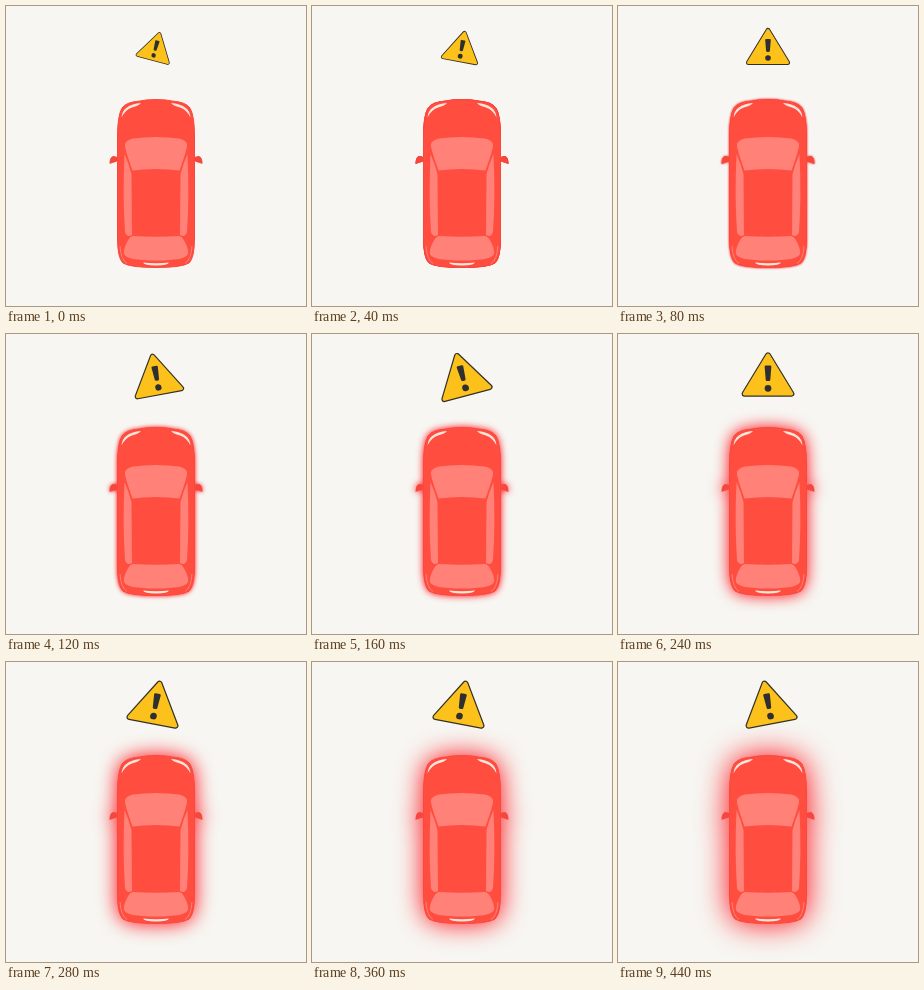
An HTML page that plays this animation: 300 px wide and 300 px high, repeating every 480 ms.

```html
<!DOCTYPE html>
<html lang="en">
<head>
<meta charset="utf-8">
<title>Car alert</title>
<style>
  html, body { margin: 0; height: 100%; overflow: hidden; background: #f7f6f2; }
  svg { display: block; width: 100vw; height: 100vh; }
</style>
</head>
<body>
<svg viewBox="0 0 300 300">
  <defs>
    <g id="side">
      <path fill="#f5473c" d="M113 158 L111 155.5 Q107 156.5 103.5 158 Q103.500 151 107 150 Q111 150 113 153Z"/>
    </g>
    <g id="trim">
      <path fill="#ff8177" d="M118.500 148 Q123 158 125.500 168 L126 229 Q121 232 119 226 Q116.500 190 118.500 148Z"/>
      <path fill="#ffe6dc" d="M115.500 111.500 Q116.500 98.500 135 97 Q133 99.500 126 101.500 Q119 104 115.500 111.500Z"/>
      <path fill="none" stroke="#ff8177" d="M114 240 Q115 254 121 257.500"/>
    </g>
  </defs>
  <g id="car">
    <use href="#side"/>
    <use href="#side" transform="matrix(-1 0 0 1 300 0)"/>
    <path fill="#ff4d40" stroke="#f9493e" d="M150 93.500 Q140 93.500 134 95 Q120 96 116 102 Q111.500 110 111.500 130 V232 Q111.500 252 117 257 Q124 261.500 150 261.500 Q176 261.500 183 257 Q188.500 252 188.500 232 V130 Q188.500 110 184 102 Q180 96 166 95 Q160 93.500 150 93.500Z"/>
    <use href="#trim"/>
    <use href="#trim" transform="matrix(-1 0 0 1 300 0)"/>
    <g fill="#ff8177">
      <path d="M119 138 Q120 134 127 132.500 Q150 129.500 173 132.500 Q180 134 181 138 Q182 141 173.500 164.500 Q150 161.500 126.500 164.500 Q118 141 119 138Z"/>
      <path d="M127 230 Q150 231.500 173 230 Q176 230 179 236 Q183 244 182 248 Q180 254.500 150 254.500 Q120 254.500 118 248 Q117 244 121 236 Q124 230 127 230Z"/>
    </g>
    <path fill="#ffe6dc" d="M137 256.500 Q150 258 163 256.500 Q162 259.500 150 259.500 Q138 259.500 137 256.500Z"/>
  </g>
  <g id="sign" stroke-linejoin="round">
    <path id="plate" fill="#333028" stroke="#333028" stroke-width="5" d="M150 24.500 L169.500 56.500 H130.500Z"/>
    <path fill="#fcc21b" stroke="#fcc21b" stroke-width="3" d="M150 24.500 L169.500 56.500 H130.500Z"/>
    <path fill="#2f2f2f" d="M147.200 34 Q147.200 33 148.200 33 H151.800 Q152.800 33 152.800 34 L151.900 45 Q151.800 46 150 46 Q148.200 46 148.100 45Z"/>
    <circle cx="150" cy="52" r="2.800" fill="#2f2f2f"/>
  </g>
</svg>
<script>
  const LOOP = 480, STEP = 40, SWING = 160;
  const car = document.getElementById('car');
  const sign = document.getElementById('sign');

  function draw(now) {
    const t = Math.floor(now % LOOP / STEP) * STEP;

    // The sign grows during its first swing, then keeps rocking.
    const swing = Math.cos(Math.PI * t / SWING);
    const scale = t < SWING ? 1 - 0.2 * swing : 1.2;
    sign.setAttribute('transform',
      `translate(150 40.5) rotate(${15 * swing}) scale(${scale}) translate(-150 -40.5)`);

    const glow = 15 * (1 - Math.cos(Math.PI * t / LOOP)) / 2;
    car.style.filter = t ? `drop-shadow(0 0 ${glow}px #ff0a14)` : 'none';
  }

  function tick() {
    draw(performance.now());
    requestAnimationFrame(tick);
  }
  tick();
</script>
</body>
</html>
```
